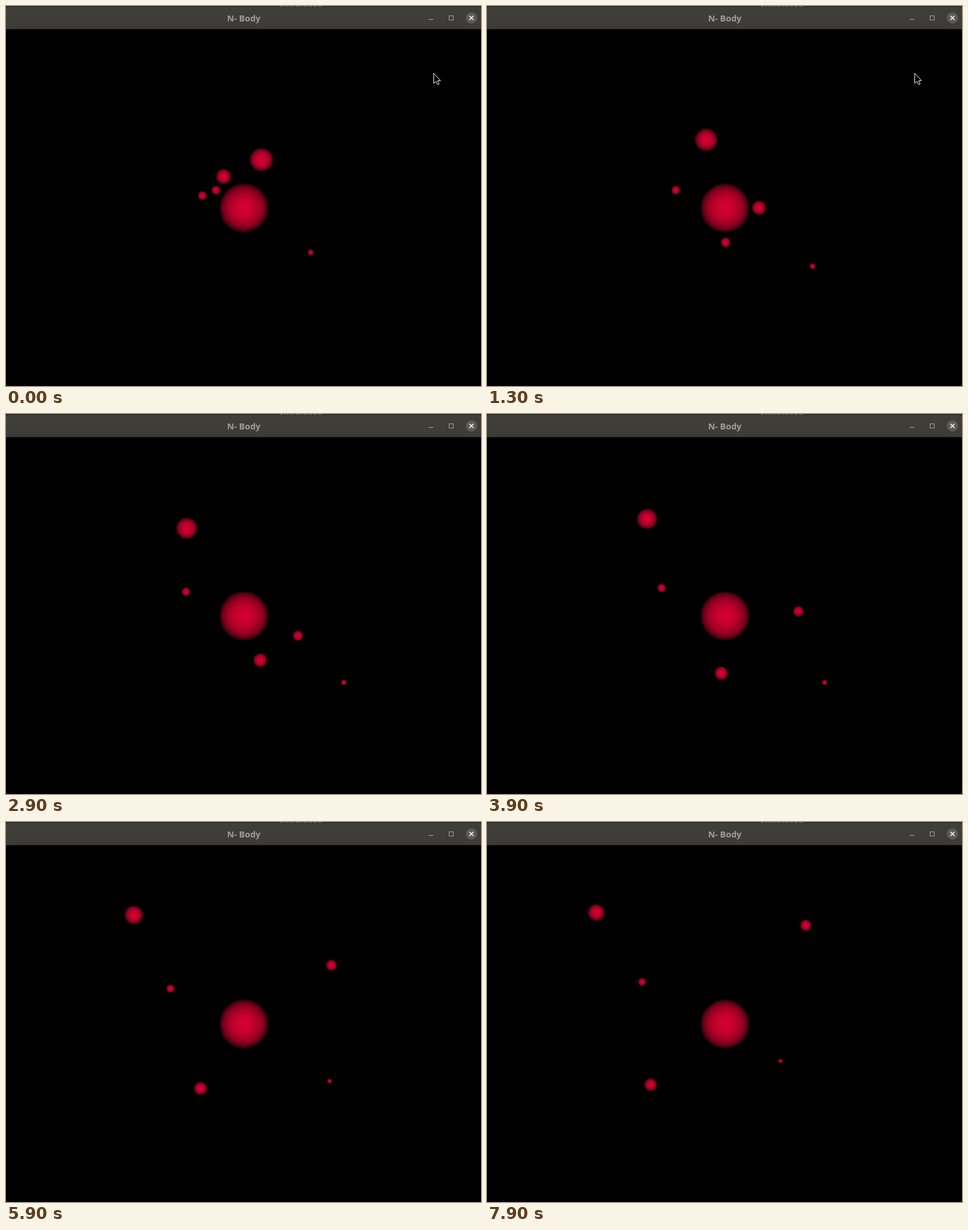
These frames come from a looping animation (797 px wide and 638 px high, 8000 ms). An HTML page:

```html
<!DOCTYPE html>
<html lang="en">
<head>
<meta charset="utf-8">
<title>N- Body</title>
<style>
  html, body { margin: 0; width: 100%; height: 100%; overflow: hidden; background: #000; }
  svg { display: block; width: 797px; height: 638px; }
  text { font-family: "Open Sans", "Noto Sans", sans-serif; font-weight: 700; }
</style>
</head>
<body>
<svg viewBox="0 0 797 638">
  <defs>
    <radialGradient id="ball"></radialGradient>
    <linearGradient id="bar" x2="0" y2="1">
      <stop stop-color="#403f3a"/>
      <stop offset="1" stop-color="#3c3b36"/>
    </linearGradient>
  </defs>
  <rect width="797" height="638"/>
  <g id="bodies"></g>

  <rect width="797" height="6" fill="#292925"/>
  <text x="459" y=".9" font-size="14.4" fill="#8a8984">simulated</text>
  <path d="M0 39V7Q0 1 6 1H791Q797 1 797 7V39Z" fill="url(#bar)"/>
  <path d="M5 1.5H792" stroke="#33322e"/>
  <path d="M0 38.5H797" stroke="#32312d"/>
  <text x="399" y="26" font-size="14.4" text-anchor="middle" fill="#a09f99">N- Body</text>
  <g fill="none" stroke="#a9a8a2">
    <path d="M709 22.5H717"/>
    <rect x="743.5" y="16.5" width="7" height="7"/>
  </g>
  <circle cx="781" cy="20" r="9.5" fill="#5b5a54"/>
  <path d="M777.5 16.5L784.5 23.5M784.5 16.5L777.5 23.5" stroke="#fff" stroke-width="1.6"/>

  <path id="cursor" d="M.7 1V17.8L4.6 14.4L7.2 20L9.8 18.9L7.3 13.3H12Z" stroke="#fff"/>
</svg>
<script>
const LOOP = 8000, STEP = 100;
const svgNS = "http://www.w3.org/2000/svg";
const byId = id => document.getElementById(id);

function add(parent, name, attrs) {
  const el = document.createElementNS(svgNS, name);
  for (const key in attrs) el.setAttribute(key, attrs[key]);
  return parent.appendChild(el);
}

// Brightness of a sphere lit from the viewer.
for (let i = 0; i <= 16; i++) {
  const angle = i / 16 * Math.PI / 2, light = Math.cos(angle);
  add(byId("ball"), "stop", {
    offset: Math.sin(angle),
    "stop-color": `rgb(${Math.round(210 * light)},0,${Math.round(48 * light)})`
  });
}

// Smooth curve through key points [seconds, x, y]; axis 1 is x, 2 is y.
function along(keys, axis, t) {
  const last = keys.length - 1;
  if (!last) return keys[0][axis];
  const gap = i => keys[i + 1][0] - keys[i][0];
  const slope = i => (keys[i + 1][axis] - keys[i][axis]) / gap(i);
  const tangent = i =>
    i === 0 ? 2 * slope(0) - tangent(1) :
    i === last ? 2 * slope(last - 1) - tangent(last - 1) :
    (gap(i) * slope(i - 1) + gap(i - 1) * slope(i)) / (gap(i - 1) + gap(i));
  let i = 0;
  while (i < last - 1 && t > keys[i + 1][0]) i++;
  const q = (t - keys[i][0]) / gap(i), p = 1 - q;
  return p * p * (1 + 2 * q) * keys[i][axis] + q * q * (1 + 2 * p) * keys[i + 1][axis]
    + gap(i) * p * q * (p * tangent(i) - q * tangent(i + 1));
}

// Radius goes from near to far; a low power changes it early.
const sun = { near: 41, far: 41, power: 1, keys: [[0, 399.3, 339]] };
const rising = {
  near: 7.7, far: 9.8, power: 0.7,
  keys: [[0, 352.5, 309.3], [0.7, 367.2, 370], [1.9, 439.5, 403],
         [2.9, 490, 372.3], [5.9, 546, 240.4], [7.9, 535, 173.5]]
};
const circling = {
  near: 13, far: 10.8, power: 0.6,
  keys: [[0, 365.1, 286.4], [0.7, 432.5, 304.5], [1.9, 457.5, 376],
         [2.9, 426.7, 413.3], [5.9, 326.5, 447.3], [7.9, 274.7, 441]]
};
const returning = {
  near: 5.2, far: 3.6, power: 1.3,
  keys: [[0, 511.3, 413.6], [1.9, 557, 444.2], [5.9, 543, 435], [7.9, 492.5, 401.3]]
};
const drifting = {
  near: 7.7, far: 6.8, power: 1,
  keys: [[0, 329.5, 318.3], [3.9, 293, 292], [7.9, 260.3, 268.5]]
};
const leaving = {
  near: 19.8, far: 14, power: 1.15,
  keys: [[0, 428.6, 258], [1.9, 342.5, 211.4], [5.9, 214.6, 156], [7.9, 183.6, 152]]
};

const bodies = [rising, returning, sun, drifting, leaving, circling];
for (const b of bodies) b.el = add(byId("bodies"), "circle", { fill: "url(#ball)" });

function draw(now) {
  const t = Math.floor(now % LOOP / STEP) * STEP / 1000;
  for (const { el, keys, near, far, power } of bodies) {
    el.setAttribute("cx", along(keys, 1, t).toFixed(2));
    el.setAttribute("cy", along(keys, 2, t).toFixed(2));
    el.setAttribute("r", (near + (far - near) * (t / 7.9) ** power).toFixed(2));
  }
  // The pointer darts right, then leaves the window.
  const cursor = byId("cursor");
  cursor.setAttribute("transform", t < 1.4 ? "translate(717 112)" : "translate(762 124)");
  cursor.setAttribute("visibility", t < 1.5 ? "visible" : "hidden");
}

const start = performance.now();
function tick() {
  draw(performance.now() - start);
  requestAnimationFrame(tick);
}
tick();
</script>
</body>
</html>
```
